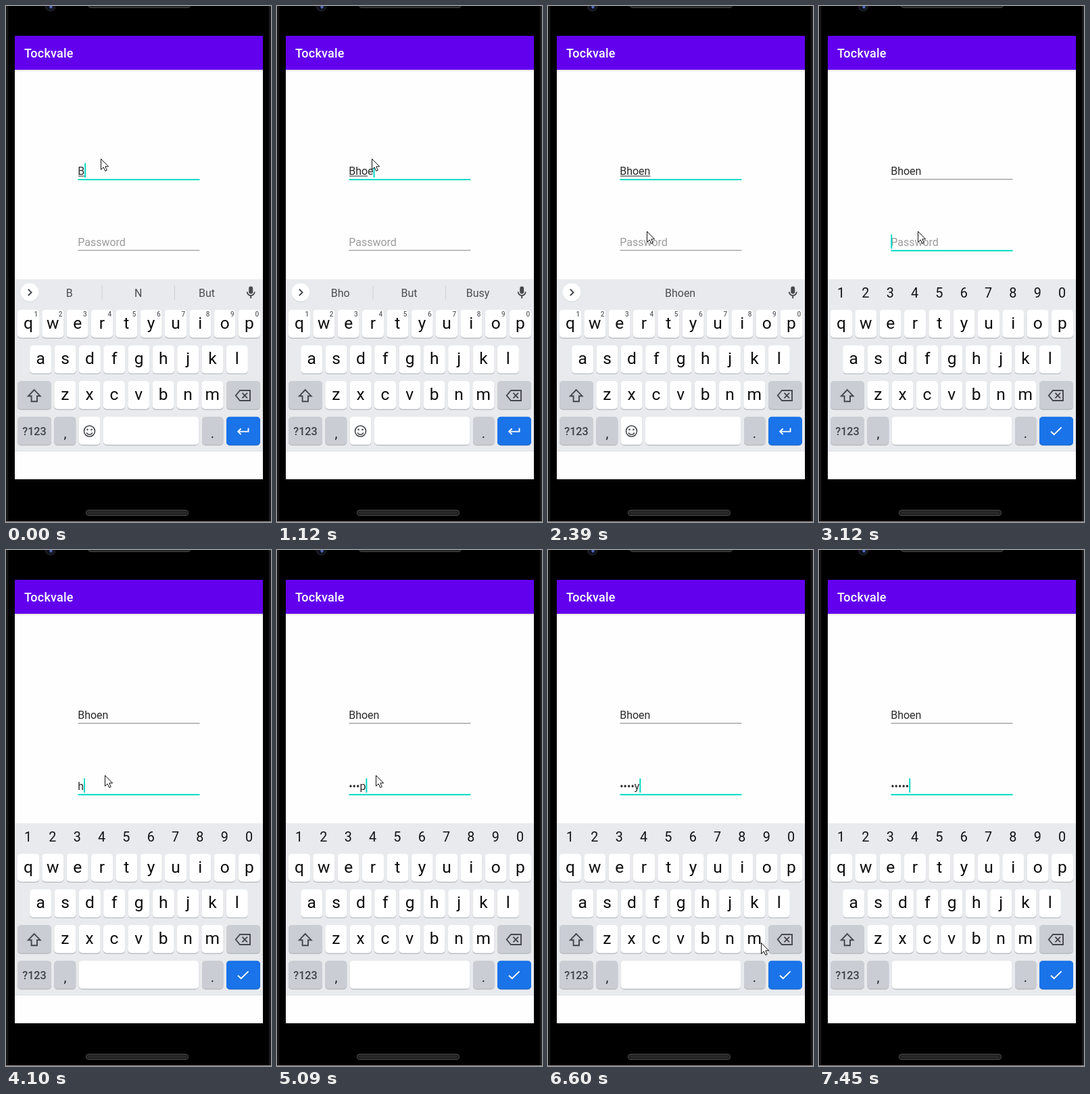
Write an HTML page that moves like this. It is 392 px wide and 761 px high and loops after 8000 ms.

```html
<!DOCTYPE html>
<html lang="en">
<head>
<meta charset="utf-8">
<title>Login form</title>
<style>
  html, body { margin: 0; width: 100%; height: 100%; overflow: hidden; background: #000; }
  svg { display: block; width: 100vw; height: 100vh; font-family: Roboto, "Noto Sans", sans-serif; }
  text { white-space: pre; }
</style>
</head>
<body>
<svg id="stage" viewBox="0 0 392 761" preserveAspectRatio="none"></svg>
<script>
const LOOP = 8000;
const USER = "Bhoen", SECRET = "happy";
const TEAL = "#03dac5", INK = "#202124", ICON = "#45484c", KEY_DARK = "#cacdd4";
const FIELD_X = 106.2, PITCH = 36.33;

const stage = document.getElementById("stage");

function add(parent, tag, attrs, content) {
  const el = document.createElementNS("http://www.w3.org/2000/svg", tag);
  for (const name in attrs) el.setAttribute(name, attrs[name]);
  if (content !== undefined) el.textContent = content;
  parent.appendChild(el);
  return el;
}
const group = (parent = stage) => add(parent, "g", {});
const rect = (p, x, y, width, height, fill, rx = 0) =>
  add(p, "rect", { x, y, width, height, fill, rx });
const circle = (p, cx, cy, r, fill) => add(p, "circle", { cx, cy, r, fill });
const line = (p, d, stroke, width = 1.9) =>
  add(p, "path", { d, stroke, "stroke-width": width, fill: "none" });
const label = (p, str, x, y, size, fill, anchor = "middle", weight = 400) =>
  add(p, "text", { x, y, fill, "font-size": size, "font-weight": weight, "text-anchor": anchor }, str);
const show = (el, on) => el.setAttribute("visibility", on ? "inherit" : "hidden");

function key(p, x, y, w, fill = "#fff", shade = "#b3b6bb") {
  rect(p, x, y + 1, w, 41.6, shade, 5);
  rect(p, x, y, w, 41.4, fill, 5);
}

function drawPhone() {
  const p = group();
  rect(p, 0, 0, 392, 761, "#000");
  rect(p, 0, 0, 1, 761, "#1d1d1f");
  rect(p, 2, 0, 1, 761, "#2c2c2e");
  rect(p, 389, 0, 1, 761, "#303032");
  rect(p, 391, 0, 1, 761, "#343436");
  rect(p, 0, 760, 392, 1, "#9a9096");
  circle(p, 65.5, 0, 8, "#1b1c21");
  circle(p, 65.5, 0, 5.5, "#0c0f1e");
  circle(p, 66.5, 1.5, 2.2, "#5068b4");
  for (const [x, y] of [[121, -6], [118, 743]]) {
    rect(p, x, y, 152, 9, "#4a4a4a", 4.5);
    rect(p, x + 1, y + 1, 150, 7, "#202020", 3.5);
    line(p, `M${x + 4} ${y + 3.5}h144M${x + 5} ${y + 5.5}h143`, "#414141", 1)
      .setAttribute("stroke-dasharray", "1 1");
  }
  rect(p, 13, 44, 367, 654, "#fefefe");
  for (let i = 0; i < 3; i++) rect(p, 13, 94 + i, 367, 1, ["#d9d9dc", "#ededee", "#f8f8f8"][i]);
  rect(p, 13, 44, 367, 50, "#6200ee");
  label(p, "Tockvale", 27, 76.2, 18, "#fff", "start", 500).setAttribute("letter-spacing", 0.2);
}

function drawKeyboard() {
  const p = group();
  rect(p, 13, 403, 367, 253.5, "#e8eaed");
  rect(p, 13, 656, 367, 1, "#dfe1e4");
  const rowY = i => 447.9 + i * 52.6;
  const letters = (str, x, row) => [...str].forEach((ch, i) => {
    const cx = x + i * PITCH;
    key(p, cx - 16, rowY(row), 32);
    label(p, ch, cx, rowY(row) + 27.7, 24.5, "#0c0c0d");
  });
  letters("qwertyuiop", 33, 0);
  letters("asdfghjkl", 51.2, 1);
  letters("zxcvbnm", 87.3, 2);

  key(p, 17, rowY(2), 50, KEY_DARK);
  line(p, "M41.8 566L33 575.2H37.6V583.2H46V575.2H50.6Z", ICON);
  key(p, 326, rowY(2), 50, KEY_DARK);
  line(p, "M346 567H361V582H346L339.8 574.5ZM349.5 570.7L357 578.3M357 570.7L349.5 578.3", ICON);

  key(p, 17, rowY(3), 50, KEY_DARK);
  label(p, "?123", 42, 633, 16.2, "#3f4246", "middle", 500);
  key(p, 71.3, rowY(3), 32, KEY_DARK);
  label(p, ",", 87.5, 637, 20, INK);
  key(p, 290, rowY(3), 31.5, KEY_DARK);
  label(p, ".", 305.5, 637, 20, INK);
  key(p, 326, rowY(3), 50, "#1a73e8", "#1c67c9");

  // variant for plain text
  const plain = group(p);
  [..."1234567890"].forEach((d, i) =>
    label(plain, d, 44.3 + i * PITCH, 458.2, 10, "#5f6368", "middle", 500));
  circle(plain, 35, 423, 13.7, "#d2d4d8");
  circle(plain, 35, 422.3, 13.5, "#fff");
  line(plain, "M32.8 417.8L37.6 422.4L32.8 427", ICON);
  rect(plain, 359.2, 413.6, 6, 11, ICON, 3);
  line(plain, "M356.7 421.5a5.5 5.5 0 0 0 11 0M362.2 427v4.2", ICON);
  key(plain, 107.7, rowY(3), 31.7);
  add(plain, "circle", { cx: 123.5, cy: 627, r: 8, fill: "none", stroke: ICON, "stroke-width": 1.6 });
  circle(plain, 120.5, 624.7, 1.3, ICON);
  circle(plain, 126.5, 624.7, 1.3, ICON);
  line(plain, "M119.2 629.2a4.7 4.7 0 0 0 8.6 0", ICON, 1.6);
  key(plain, 144, rowY(3), 141.3);
  line(plain, "M358.5 622.5V627.6H343.5M347.6 623.3L343.2 627.6L347.6 631.9", "#fff");

  // variant for passwords
  const secret = group(p);
  [..."1234567890"].forEach((d, i) => label(secret, d, 32.6 + i * PITCH, 430.2, 19.8, "#111214"));
  key(secret, 107.7, rowY(3), 177.6);
  line(secret, "M343 627.5L347.8 632L358.6 621.4", "#fff");
  return { plain, secret };
}

function makeField(y) {
  const p = group();
  return {
    text: label(p, "", FIELD_X, y, 16, INK, "start"),
    composing: rect(p, 107, y + 1.4, 0, 1, INK),
    bar: rect(p, 106.5, y + 6, 180, 1, "#888"),
    caret: rect(p, 0, y - 17, 2, 21, TEAL)
  };
}

const ruler = document.createElement("canvas").getContext("2d");
function widthOf(str) {
  ruler.font = '16px Roboto, "Noto Sans", sans-serif';
  return ruler.measureText(str).width;
}

function setField(f, s) {
  f.text.textContent = s.value || s.hint || "";
  f.text.setAttribute("fill", s.value ? "#2a2a2a" : "#9c9c9c");
  f.composing.setAttribute("width", s.composing ? widthOf(s.composing) - 0.8 : 0);
  f.bar.setAttribute("height", s.focus ? 2 : 1);
  f.bar.setAttribute("fill", s.focus ? TEAL : "#878787");
  f.caret.setAttribute("x", FIELD_X + widthOf(s.value));
  show(f.caret, s.caret);
}

// number of listed moments already passed
const passed = (t, times) => times.filter(m => t >= m).length;
const within = (t, ...spans) => spans.some(([a, b]) => t >= a && t < b);

// tip of the pointer: [time, x, y], held until the next entry
const PATH = [
  [0, 140, 225], [2000, 141, 238], [2130, 144, 281], [2260, 146, 320], [2390, 146, 332],
  [6000, 165, 359], [6150, 237, 462], [6300, 318, 584], [6450, 341, 623],
  [6600, 315, 579], [6750, 148, 431], [6900, 29, 320], [7050, 27, 282]
];

const WORDS = [
  ["B", "N", "But"],
  [USER.slice(0, 2), "Be", "By"],
  [USER.slice(0, 3), "But", "Busy"],
  ["", USER.slice(0, 4), ""],
  ["", USER, ""]
];

drawPhone();
const board = drawKeyboard();
const strip = group();
const dividers = group(strip);
rect(dividers, 141.5, 412, 1, 21.5, "#cdd0d4");
rect(dividers, 249, 412, 1, 21.5, "#cdd0d4");
const hints = [93.7, 195.6, 297].map(x => label(strip, "", x, 428.7, 16, "#4b4e52"));
const user = makeField(249);
const pass = makeField(353.8);
const pointer = add(stage, "path", {
  d: "M.5.5V16.3L4.2 12.9L6.8 18.4L9.2 17.3L6.8 11.8H11.6Z",
  fill: "#fff", stroke: "#111", "stroke-width": 1
});

function draw(t) {
  const typed = 1 + passed(t, [570, 850, 1120, 1420]);
  const composed = 1 + passed(t, [850, 1120, 1420, 1720]);
  const moved = t >= 2820, swapped = t >= 3120;

  setField(user, {
    value: USER.slice(0, typed),
    composing: swapped ? "" : USER.slice(0, composed),
    focus: !moved,
    caret: within(t, [0, 280], [570, 2000], [2690, 3120])
  });

  const count = passed(t, [4100, 4500, 4940, 5090, 5550]);
  const clear = count && t < 7050 ? 1 : 0;
  setField(pass, {
    value: "\u2022".repeat(count - clear) + (clear ? SECRET[count - 1] : ""),
    hint: "Password",
    focus: moved,
    caret: within(t, [2820, 3580], [4100, 6150], [6600, 7050], [7450, LOOP])
  });

  WORDS[composed - 1].forEach((w, i) => { hints[i].textContent = w; });
  show(dividers, composed < 4);
  show(strip, !swapped);
  show(board.plain, !swapped);
  show(board.secret, swapped);

  const [, x, y] = PATH[passed(t, PATH.map(s => s[0])) - 1];
  pointer.setAttribute("transform", `translate(${x} ${y})`);
  show(pointer, t < 7330);
}

const start = performance.now();
function tick() {
  draw((performance.now() - start) % LOOP);
  requestAnimationFrame(tick);
}
draw(0);
requestAnimationFrame(tick);
</script>
</body>
</html>
```
